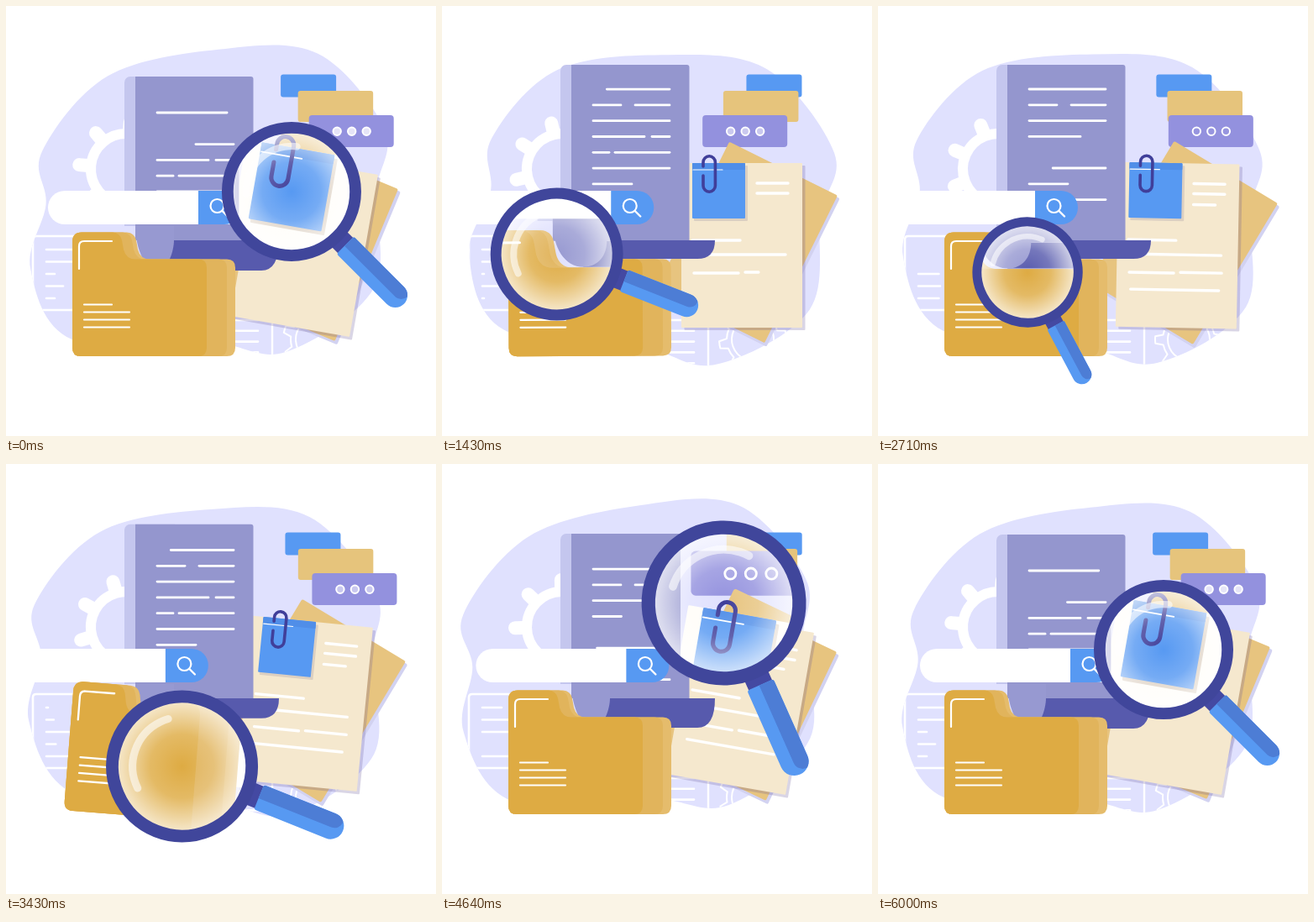
These frames come from a looping animation (512 px wide and 512 px high, 6.07 s). An HTML page with a canvas:

```html
<!DOCTYPE html>
<html lang="en">
<head>
<meta charset="utf-8">
<title>Document search</title>
<style>
html, body { margin: 0; width: 100%; height: 100%; overflow: hidden; background: #fff; }
canvas { display: block; width: 100vw; height: 100vh; }
</style>
</head>
<body>
<canvas id="stage"></canvas>
<script>
const canvas = document.getElementById('stage');
const c = canvas.getContext('2d');
const LOOP = 6000, REST = 70, TAU = Math.PI * 2, DEG = Math.PI / 180;
const WHITE = '#fff', BLUE = '#5799f2', NAVY = '#40469b';

// Motion helpers
const clamp = u => Math.min(1, Math.max(0, u));
const mix = (a, b, u) => a + (b - a) * u;
const wave = (t, peak, period) => Math.cos((t - peak) / period * TAU);
function ramp(t, from, to) {
  const u = clamp((t - from) / (to - from));
  return u * u * (3 - 2 * u);
}
// Falls from 1 to 0, waits, and rises to 1 again.
const dip = (t, a, b, d, e) => 1 - ramp(t, a, b) + ramp(t, d, e);
const bump = (t, peak, half) => 1 - dip(t, peak - half, peak, peak, peak + half) - (1 - 2 * ramp(t, peak - half, peak))
  - (1 - 1) - (ramp(t, peak - half, peak) - ramp(t, peak, peak + half)) + 1 - ramp(t, peak, peak + half);

// Drawing helpers
function group(draw) { c.save(); draw(); c.restore(); }
function box(x, y, w, h, r, color) {
  c.beginPath();
  c.roundRect(x, y, w, h, r);
  c.fillStyle = color;
  c.fill();
}
function shape(d, color) { c.fillStyle = color; c.fill(new Path2D(d)); }
function trace(d, width, color = WHITE) {
  c.strokeStyle = color;
  c.lineWidth = width;
  c.lineCap = c.lineJoin = 'round';
  c.stroke(new Path2D(d));
}
function line(x1, y, x2, width = 2.8) {
  if (x2 - x1 > 1) trace(`M${x1} ${y}H${x2}`, width);
}
function ring(x, y, r, width, color = WHITE) {
  c.beginPath();
  c.arc(x, y, r, 0, TAU);
  c.strokeStyle = color;
  c.lineWidth = width;
  c.stroke();
}

const BLOB = [[252, 54], [370, 63], [450, 157], [440, 232], [438, 345], [334, 417],
  [242, 402], [79, 393], [29, 307], [47, 231], [42, 168], [120, 81]];

// A smooth closed outline, sheared to and fro.
function blobPath(t) {
  const sway = .1 * wave(t, 1450, LOOP), swell = .08 * wave(t, 1950, LOOP);
  const pts = BLOB.map(([x, y]) => [x + sway * Math.min(170, 340 - y), y + swell * (x - 190)]);
  const pt = i => pts[(i + pts.length) % pts.length];
  const handle = (i, side) => [0, 1].map(k => pt(i)[k] + side * (pt(i + 1)[k] - pt(i - 1)[k]) / 6);
  c.beginPath();
  c.moveTo(...pt(0));
  pts.forEach((_, i) => c.bezierCurveTo(...handle(i, 1), ...handle(i + 1, -1), ...pt(i + 1)));
}

function solidGear(turn) {
  c.translate(143, 194);
  c.rotate(turn);
  ring(0, 0, 42, 12);
  for (let i = 0; i < 8; i++) {
    trace('M46 0H56', 16);
    c.rotate(TAU / 8);
  }
}

function lineGear(turn) {
  c.translate(370, 397);
  c.rotate(turn);
  ring(0, 0, 25, 2);
  c.beginPath();
  for (let i = 0; i < 8; i++) {
    const a = i * TAU / 8;
    c.arc(0, 0, 31, a - .2, a + .2);
    c.arc(0, 0, 40, a + .29, a + .5);
  }
  c.closePath();
  c.lineJoin = 'round';
  c.stroke();
}

function background(t) {
  blobPath(t);
  c.fillStyle = '#e0e1fe';
  c.fill();
  c.clip();
  const turn = mix(158, 185, dip(t, 350, 2100, 2500, 5600)) * DEG;
  group(() => solidGear(turn));
  group(() => lineGear(-turn));
  trace('M100 362H32V278Q32 274 36 274H100', 2.6);
  for (let i = 0; i < 5; i++) {
    line(48, 290 + 14.5 * i, 68 + 20 * wave(t, -500 * i * i, LOOP), 2.6);
    line(250, 374 + 12.8 * i, 300, 2.6);
  }
  trace('M317 350V460', 2.4);
}

function chats(t) {
  const half = LOOP / 2;
  box(345 - 18 * wave(t, 50, half), 81.5, 66, 27, 3, BLUE);
  box(341 + 7.5 * wave(t, 230, half), 101, 89.5, 37, 3, '#e6c47c');
  const x = 334 + 32 * wave(t, 280, half);
  box(x, 130, 101, 38, 4, '#9391de');
  c.fillStyle = `rgba(255,255,255,${.4 + .4 * wave(t, 1850, LOOP / 3)})`;
  for (let i = 0; i < 3; i++) {
    ring(x + 33.5 + 17.5 * i, 149.3, 4.7, 2);
    c.fill();
  }
}

// A sheet hangs from its top right corner.
function placeSheet(x, y, deg) {
  c.translate(x, y);
  c.rotate(deg * DEG);
  c.translate(-144, 0);
}

function envelope(t) {
  const s = dip(t, 540, 2450, 3500, 5400);
  placeSheet(476 - 9 * s, 235 - 17 * s, 31 - 8.4 * s);
  box(4, 2, 144, 197, 2, '#d2d2f1');
  box(0, 0, 144, 196, 2, '#e7c47f');
}

// Text strokes in the order in which they are written.
const STROKES = [[13, 92, 70], [90, 24, 127], [13, 109, 124], [90, 36, 127],
  [15, 131, 68], [76, 130, 125], [90, 49, 116], [17, 151, 122]];

function paper(t, zoomed) {
  const s = dip(t, 0, 1400, 2280, 4400);
  placeSheet(429 + 14 * s, 187 + 14 * s, 10 * s);
  box(3.5, 3, 144, 196, 1, 'rgba(105,90,150,.25)');
  box(0, 0, 144, 196, 1, zoomed ? '#fffdf8' : '#f5e8ce');
  const written = 8 * (clamp((t - 100) / 2000) - ramp(t, 4800, 5700));
  STROKES.forEach(([x1, y, x2], i) => line(x1, y, mix(x1, x2, clamp(written - i)), 3.4));
  box(15, 3, 64, 66, 1, '#dccfc0');
  box(13, 0, 63, 66, 1, BLUE);
  box(13, 0, 63, 8, 1, '#508ee8');
  trace('M14 8H49', 1.2);
  trace('M26 15V27a7.2 7.2 0 0 0 14.4 0V-1a7.2 7.2 0 0 0 -14.4 0V4', 3.6, '#403f9a');
}

// Gaps in the rows of the scroll.
const GAPS = { 1: [213, 230], 3: [241, 250], 4: [199, 206], 6: [226, 271], 7: [180, 230] };

function scroll(t) {
  const drop = 14 * dip(t, 0, 1480, 3000, 4950), top = 70 + drop, end = 301 + drop;
  shape(`M180 279H325Q325 ${end} 304 ${end}H180Z`, '#575aad');
  box(141, top, 60, 192 - drop, [7, 0, 0, 0], '#c4c6ee');
  box(154, top, 140.5, 279 - top, [0, 3, 0, 0], '#9496ce');
  shape(`M154 262C154 285 164 ${end} 180 ${end}C193 ${end} 200 291 200 279V262Z`, '#9799d1');
  // Each row is written and wiped three times, a little after the row above.
  for (let i = 0; i < 8; i++) {
    const age = (t + LOOP - 1780 - 250 * i) % (LOOP / 3);
    const a = mix(180, 271, ramp(age, 1570, 1870)), b = mix(180, 271, ramp(age, 0, 270));
    const y = top + drop + 29 + 18.8 * i, [g1, g2] = GAPS[i] || [271, 271];
    line(a, y, Math.min(b, g1));
    line(Math.max(a, g2), y, b);
  }
}

function searchBar(t) {
  const x = mix(187, 229, dip(t, 0, 2350, 3065, 5350));
  box(x - 179, 220, 200, 40, 20, WHITE);
  box(x, 220, 51, 40, [0, 20, 20, 0], BLUE);
  ring(x + 22.5, 238, 8, 2.2);
  trace(`M${x + 28.5} 244L${x + 35} 250.5`, 2.4);
}

function folderLayer(tab, right, color) {
  shape(`M79 281Q79 269.5 90 269.5H${tab - 11}Q${tab - 2} 270 ${tab} 279L${tab + 2} 290`
    + `Q${tab + 5} 301.5 ${tab + 16} 301.5H${right - 10}q10 0 10 10V407q0 10 -10 10H89q-10 0 -10 -10Z`, color);
}

function folder(t) {
  const nudge = (peak, half) => ramp(t, peak - half, peak) - ramp(t, peak, peak + half);
  const tilt = 4.5 * nudge(3430, 620) - 3.3 * nudge(790, 780), size = 1 + tilt / 100;
  c.translate(176, 343.5);
  c.rotate(tilt * DEG);
  c.scale(size, size);
  c.translate(-176, -343.5);
  folderLayer(155, 273, '#e5bc6c');
  folderLayer(150, 263, '#e1b45c');
  folderLayer(138, 239, '#deab43');
  trace('M87 313V286Q87 280 93 280H126', 2.2);
  for (let i = 0; i < 4; i++) line(93, 355.5 + 9 * i, i ? 147 : 126, 2.2);
}

function scene(t, zoomed) {
  group(() => background(t));
  chats(t);
  group(() => envelope(t));
  group(() => paper(t, zoomed));
  scroll(t);
  searchBar(t);
  group(() => folder(t));
}

// Stops of the lens: time, centre x and y, radius, handle angle
const STOPS = [
  [0, 340, 221, 83, 45],
  [500, 262, 140, 97, 34],
  [790, 212.5, 167, 100, 28],
  [2070, 98.5, 385, 58, 18.5],
  [2710, 178, 317, 65.5, 62],
  [3430, 209.5, 360, 90.5, 21.8],
  [4640, 335.5, 165.5, 98, 66],
  [5150, 362, 275, 94, 57]
];

// Periodic smooth path through the stops, without overshoot.
function lensAt(t, k) {
  const n = STOPS.length;
  const stop = i => STOPS[(i + n) % n];
  const time = i => stop(i)[0] + Math.floor(i / n) * LOOP;
  const slope = i => (stop(i + 1)[k] - stop(i)[k]) / (time(i + 1) - time(i));
  const tangent = i => {
    const a = slope(i - 1), b = slope(i);
    return a * b > 0 ? 2 * a * b / (a + b) : 0;
  };
  let i = n - 1;
  while (time(i) > t) i--;
  const h = time(i + 1) - time(i), u = (t - time(i)) / h, w = 1 - u;
  return mix(stop(i)[k], stop(i + 1)[k], u * u * (3 - 2 * u))
    + h * u * w * (tangent(i) * w - tangent(i + 1) * u);
}

function lens(t) {
  const [x, y, r, deg] = [1, 2, 3, 4].map(k => lensAt(t, k));
  const focusX = x + 11 + .07 * y - .08 * x;
  const focusY = y + .5 * (r - 85) + .035 * (230 - y);
  group(() => {
    c.beginPath();
    c.arc(x, y, r * .87, 0, TAU);
    c.clip();
    c.fillStyle = WHITE;
    c.fill();
    group(() => {
      c.translate(x, y);
      c.scale(1.4, 1.4);
      c.translate(-focusX, -focusY);
      scene(t, true);
    });
    const glow = c.createRadialGradient(x, y, 0, x, y, r * .84);
    glow.addColorStop(0, 'rgba(255,255,255,0)');
    glow.addColorStop(.5, 'rgba(255,255,255,.18)');
    glow.addColorStop(1, 'rgba(255,255,255,.7)');
    c.fillStyle = glow;
    c.fillRect(x - r, y - r, r * 2, r * 2);
  });
  c.translate(x, y);
  c.rotate(deg * DEG);
  c.scale(r, r);
  box(.96, -.155, .2, .31, 0, '#4449a2');
  box(1.09, -.175, 1.19, .35, [.03, .175, .175, .03], BLUE);
  group(() => {
    c.clip();
    box(1.09, -.175, 1.15, .19, [0, 0, .12, 0], '#4d7dd5');
  });
  ring(0, 0, .917, .166, NAVY);
  c.beginPath();
  c.arc(0, 0, .65, 132 * DEG, 232 * DEG);
  c.strokeStyle = 'rgba(255,255,255,.58)';
  c.lineWidth = .1;
  c.lineCap = 'round';
  c.stroke();
}

const start = performance.now();

function frame(now) {
  // The first pose rests briefly at the end of each round.
  const t = Math.min(Math.max(0, now - start) % (LOOP + REST), LOOP) % LOOP;
  const ratio = window.devicePixelRatio || 1;
  const w = Math.round(innerWidth * ratio), h = Math.round(innerHeight * ratio);
  if (canvas.width !== w || canvas.height !== h) {
    canvas.width = w;
    canvas.height = h;
  }
  c.setTransform(w / 512, 0, 0, h / 512, 0, 0);
  c.clearRect(0, 0, 512, 512);
  scene(t, false);
  group(() => lens(t));
  requestAnimationFrame(frame);
}
requestAnimationFrame(frame);
</script>
</body>
</html>
```
